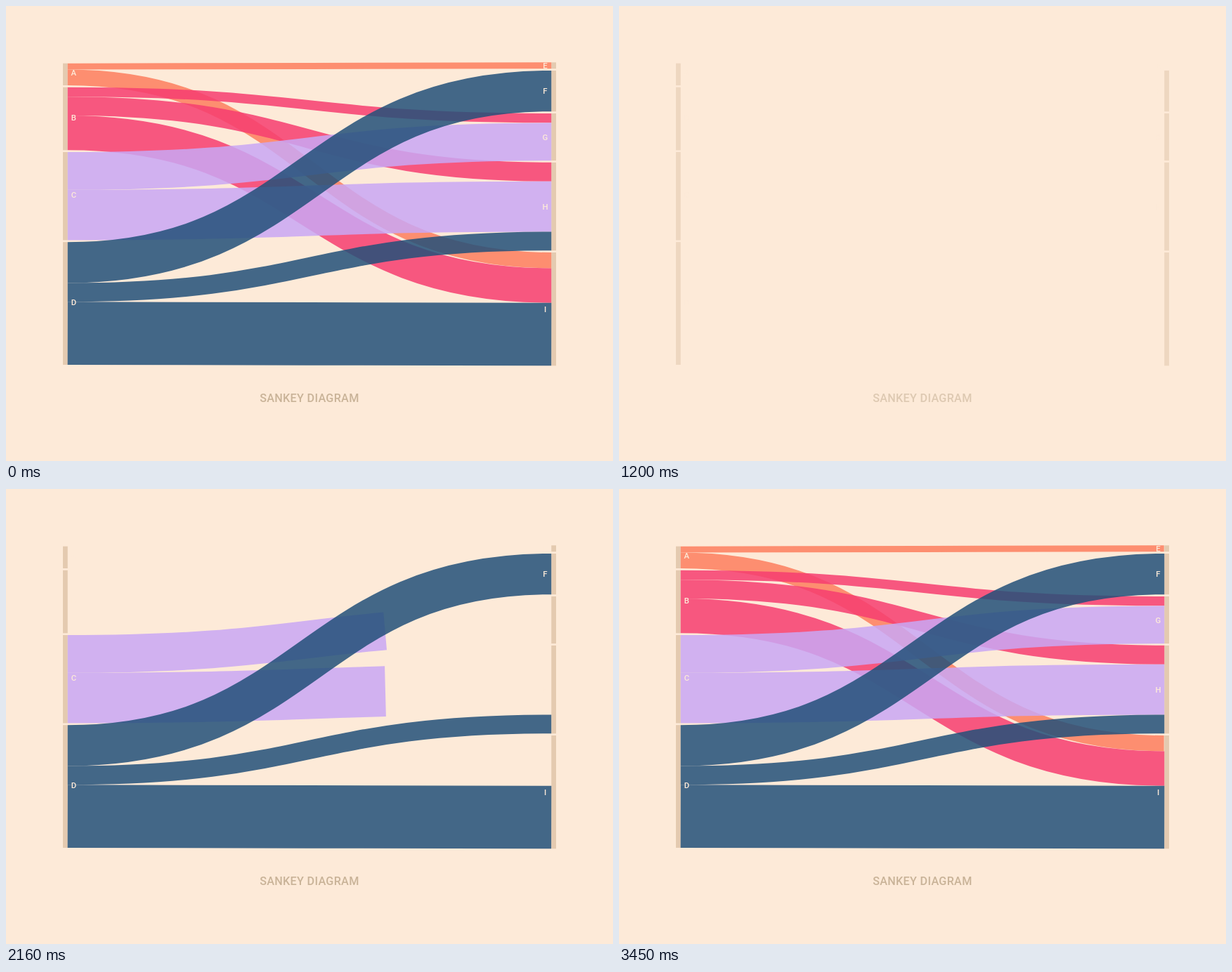
Recreate the animation shown at these times as an HTML page. Size 864 by 648 pixels, loop 4050 ms.

```html
<!DOCTYPE html>
<html lang="en">
<head>
<meta charset="utf-8">
<title>Sankey diagram</title>
<style>
  html, body { margin: 0; width: 100%; height: 100%; overflow: hidden; background: #fdead8; }
  svg { display: block; width: 100vw; height: 100vh; }
  text { font-family: Roboto, Inter, sans-serif; font-weight: 500; text-anchor: middle; }
  .label { font-size: 11.4px; fill: #fdead8; }
  .title { font-size: 16.2px; fill: #c9b398; letter-spacing: .3px; }
  .node { fill: #e4cab0; }
  .link { fill: none; stroke-opacity: .85; }
</style>
</head>
<body>
<svg viewBox="0 0 864 648"><g id="chart"></g></svg>
<script>
const LOOP = 4050;
const UNIT = 4.481, GAP = 2.7, NODE_WIDTH = 6.75;
const LEFT = 81, RIGHT = 776.25;
const DRAW_TIME = 660;
const E_NODE_TIME = 1845;

const sources = {
  A: { color: '#fd7e5f', start: 2849, flows: { E: 2, I: 5 } },
  B: { color: '#f63e70', start: 2406, flows: { G: 3, H: 6, I: 11 } },
  C: { color: '#c9a7f5', start: 1963, flows: { G: 12, H: 16 } },
  D: { color: '#235079', start: 1527, flows: { F: 13, H: 6, I: 20 } }
};
const targets = { E: 2, F: 13, G: 15, H: 28, I: 36 };

const chart = document.getElementById('chart');

function add(tag, attributes, text = '') {
  const element = document.createElementNS('http://www.w3.org/2000/svg', tag);
  for (const name in attributes) element.setAttribute(name, attributes[name]);
  element.textContent = text;
  chart.append(element);
  return element;
}

// Stacks one column of nodes and returns where each one's next flow attaches.
function addColumn(x, y, sizes, labelX, labelShift) {
  const column = {};
  for (const name in sizes) {
    const height = sizes[name] * UNIT;
    const rect = add('rect', { class: 'node', x, y, width: NODE_WIDTH, height });
    column[name] = { rect, next: y, labelX, labelY: y + height / 2 + labelShift };
    y += height + GAP;
  }
  return column;
}

const sourceSizes = {};
for (const name in sources) {
  sourceSizes[name] = Object.values(sources[name].flows).reduce((a, b) => a + b);
}
const left = addColumn(LEFT, 81.65, sourceSizes, 96.4, -2);
const right = addColumn(RIGHT, 80.3, targets, 767.5, 0);

const links = [];
for (const from in sources) {
  const { color, start, flows } = sources[from];
  for (const to in flows) {
    const width = flows[to] * UNIT;
    const y0 = left[from].next + width / 2;
    const y1 = right[to].next + width / 2;
    left[from].next += width;
    right[to].next += width;
    const path = add('path', {
      class: 'link', stroke: color, 'stroke-width': width, pathLength: 1,
      d: `M${LEFT + NODE_WIDTH},${y0}C432,${y0} 432,${y1} ${RIGHT},${y1}`
    });
    links.push({ path, start });
  }
}

for (const [name, { labelX, labelY }] of Object.entries({ ...left, ...right })) {
  add('text', { class: 'label', x: labelX, y: labelY + 4.1 }, name);
}
add('text', { class: 'title', x: 431.9, y: 563.7 }, 'SANKEY DIAGRAM');

const progress = (t, start, duration) => Math.min(1, Math.max(0, (t - start) / duration));
const easeOut = p => 1 - (1 - p) ** 3;
const easeInOut = p => (1 - Math.cos(Math.PI * p)) / 2;

function render(t) {
  const leaving = t < 750;
  chart.style.opacity = leaving
    ? 1 - easeInOut(progress(t, 295, 455))
    : progress(t, 1110, 150);
  right.E.rect.style.opacity = leaving || t >= E_NODE_TIME ? 1 : 0;
  for (const { path, start } of links) {
    const drawn = leaving ? 1 : easeOut(progress(t, start, DRAW_TIME));
    path.style.visibility = drawn > 0 ? 'visible' : 'hidden';
    path.style.strokeDasharray = drawn < 1 ? `${drawn} 2` : 'none';
  }
}

const origin = performance.now();
function frame() {
  render((performance.now() - origin) % LOOP);
  requestAnimationFrame(frame);
}
frame();
</script>
</body>
</html>
```
